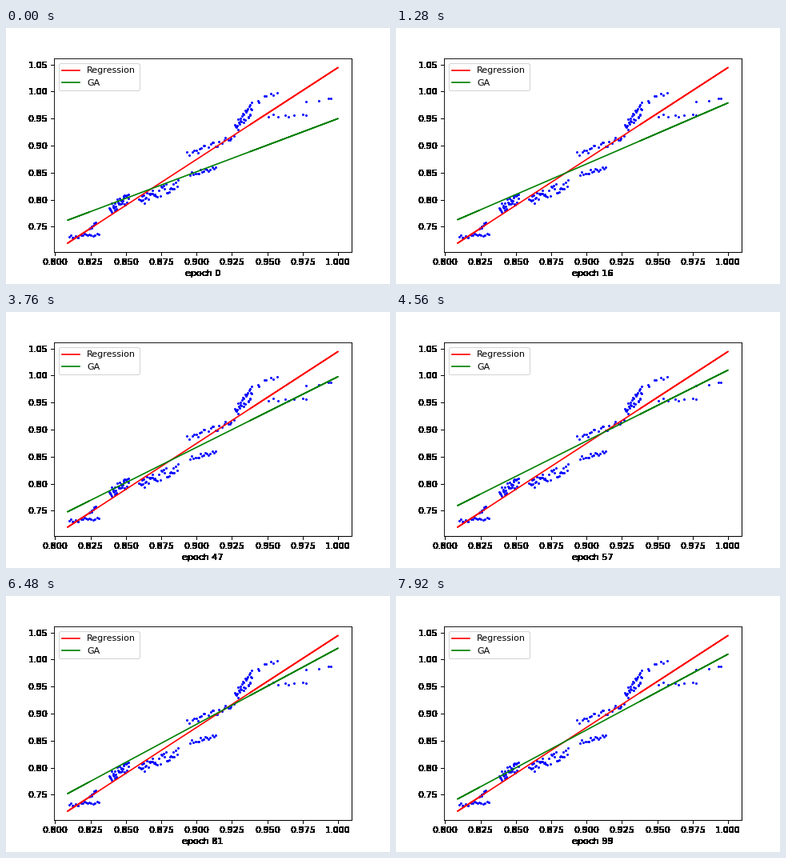
Animation of 480 by 320 pixels, one loop 8 s. Source, as a matplotlib script:

```python
import numpy as np
import matplotlib.pyplot as plt
from matplotlib.animation import FuncAnimation

FRAMES, INTERVAL = 100, 80
LEFT, RIGHT = 0.8088, 1.0  # range of the samples
REGRESSION = (0.7195, 1.0444)  # values at both ends

# Streaks of samples: start, end, vertical spread, count
STREAKS = [
    ((0.809, 0.731), (0.831, 0.737), 0.003, 18),
    ((0.824, 0.745), (0.829, 0.758), 0.003, 8),
    ((0.838, 0.783), (0.852, 0.804), 0.010, 34),
    ((0.859, 0.797), (0.872, 0.813), 0.009, 20),
    ((0.873, 0.813), (0.887, 0.833), 0.010, 18),
    ((0.893, 0.884), (0.927, 0.916), 0.006, 24),
    ((0.895, 0.848), (0.914, 0.859), 0.004, 16),
    ((0.927, 0.934), (0.939, 0.968), 0.011, 28),
    ((0.936, 0.975), (0.959, 1.000), 0.004, 9),
    ((0.950, 0.956), (0.979, 0.956), 0.005, 8),
    ((0.975, 0.983), (1.000, 0.987), 0.002, 4),
]

# Best fit of the search: first epoch, values at both ends
FITS = [
    (0, 0.762, 0.950), (3, 0.763, 0.979), (20, 0.760, 0.987),
    (41, 0.748, 0.998), (56, 0.7595, 1.010), (78, 0.752, 1.021),
    (89, 0.742, 1.010),
]

# The lines run back over both ends, as unsorted samples do
LINE_X = np.array([0.824, LEFT, RIGHT, 0.938])


def line_y(left, right):
    return left + (right - left) * (LINE_X - LEFT) / (RIGHT - LEFT)


def padded(low, high, margin=0.05):
    pad = margin * (high - low)
    return low - pad, high + pad


def sample_points():
    rng = np.random.default_rng(7)
    streaks = []
    for start, end, spread, count in STREAKS:
        t = (np.arange(count) + rng.random(count)) / count
        points = np.outer(1 - t, start) + np.outer(t, end)
        points[:, 1] += rng.uniform(-spread, spread, count)
        streaks.append(points)
    return np.vstack(streaks).T


def hard_edges(image, dpi):
    """Turn every touched pixel solid black, without smoothing."""
    solid = np.zeros_like(image)
    solid[..., 3] = image[..., 3] > 0
    return solid, 0, 0


plt.rcParams.update({"font.family": "DejaVu Sans", "font.size": 10})
fig = plt.figure(figsize=(6, 4), dpi=80, facecolor="white")
fig.subplots_adjust(left=0.125, right=0.9, bottom=0.125, top=0.88)
ax = fig.add_subplot()

ax.plot(*sample_points(), "o", color="blue", ms=2.7, mew=0, zorder=1)
ax.plot(LINE_X, line_y(*REGRESSION), color="red", lw=1.5, label="Regression")
(fit_line,) = ax.plot(LINE_X, line_y(*FITS[0][1:]), color="green", lw=1.5, label="GA")

ax.set(xlim=padded(LEFT, RIGHT), ylim=padded(*REGRESSION))
ax.set_xticks(np.arange(0.8, 1.001, 0.025))
ax.set_yticks(np.arange(0.75, 1.051, 0.05))
ax.xaxis.set_major_formatter("{x:.3f}")
ax.yaxis.set_major_formatter("{x:.2f}")
ax.legend(loc="upper left")
for artist in (ax.xaxis, ax.yaxis, ax.spines["right"], ax.spines["bottom"]):
    artist.set_agg_filter(hard_edges)


def update(epoch):
    _, left, right = [fit for fit in FITS if fit[0] <= epoch][-1]
    fit_line.set_ydata(line_y(left, right))
    ax.set_xlabel(f"epoch {epoch}")
    return (fit_line,)


anim = FuncAnimation(fig, update, frames=FRAMES, interval=INTERVAL,
                     repeat=True, repeat_delay=0, blit=False)
plt.show()
```
